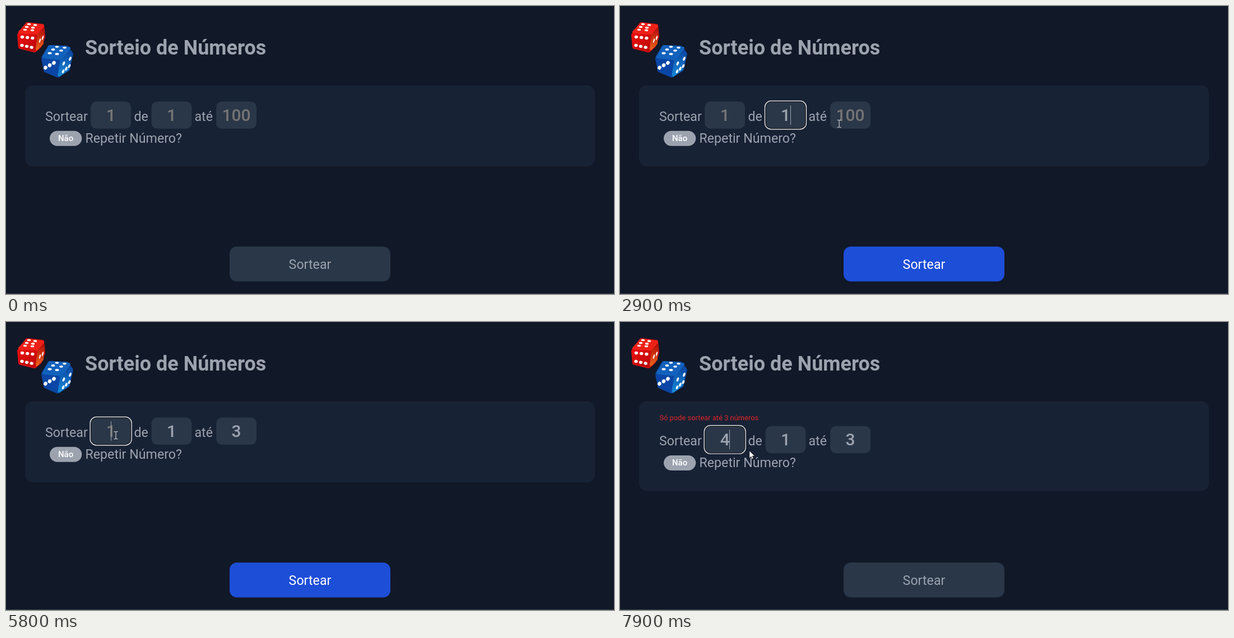
An HTML page that plays this animation: 1085 px wide and 516 px high, repeating every 8000 ms.

```html
<!DOCTYPE html>
<html lang="pt">
<head>
<meta charset="utf-8">
<title>Sorteio de Números</title>
<style>
  html, body { margin: 0; width: 100%; height: 100%; overflow: hidden; background: #111827; }
  svg { display: block; width: 1085px; height: 516px; }
  text { font-family: Roboto, sans-serif; fill: #9ca3af; }
  .label { font-size: 23.2px; }
  .value { font-size: 30px; font-weight: 500; text-anchor: middle; }
  .pips { fill: #fff; }
  .middle { text-anchor: middle; }
</style>
</head>
<body>
<svg viewBox="0 0 1085 516">
  <defs>
    <linearGradient id="redFront" x2="1" y2="1">
      <stop stop-color="#e80d0d"/><stop offset="1" stop-color="#bd0a0a"/>
    </linearGradient>
    <linearGradient id="redSide" x2="0" y2="1">
      <stop stop-color="#b60d08"/><stop offset="1" stop-color="#e8611c"/>
    </linearGradient>
    <linearGradient id="blueSide" x2="0" y2="1">
      <stop stop-color="#0c4ca8"/><stop offset="1" stop-color="#1687d6"/>
    </linearGradient>
  </defs>
  <rect width="1085" height="516" fill="#111827"/>
  <rect y="515" width="1085" height="1" fill="#3b424f"/>

  <g stroke-linejoin="round" stroke-width="8">
    <path d="M38 33L64 36L66 55L60 71L51 79L26 73L24 52Z" fill="#d31010" stroke="#d31010"/>
    <path d="M38 33L65 36L56 49L25 47Z" fill="#ee2118" stroke="#ee2118" stroke-width="6"/>
    <path d="M24 52L53 54L50 78L25 73Z" fill="url(#redFront)" stroke="url(#redFront)" stroke-width="6"/>
    <path d="M58 52L67 41L65 67L55 77Z" fill="url(#redSide)" stroke="url(#redSide)" stroke-width="4"/>
    <path d="M78 74L108 75L116 86L110 113L92 124L71 115L67 93Z" fill="#0b469e" stroke="#0b469e"/>
    <path d="M79 73L112 76L98 94L68 91Z" fill="#1262bd" stroke="#1262bd" stroke-width="6"/>
    <path d="M66 97L94 99L92 124L71 115Z" fill="#0a46a5" stroke="#0a46a5" stroke-width="5"/>
    <path d="M99 98L116 84L110 113L95 124Z" fill="url(#blueSide)" stroke="url(#blueSide)" stroke-width="5"/>
  </g>
  <g class="pips" id="pips"></g>

  <text x="141" y="87" font-size="36" font-weight="700">Sorteio de Números</text>

  <rect id="panel" x="34" y="142" width="1017" height="145.5" rx="14" fill="#182235"/>
  <text id="error" x="70.5" y="176" font-size="12.9" style="fill:#dc2626">Só pode sortear até 3 números</text>
  <g id="form">
    <text class="label" x="70" y="206">Sortear</text>
    <text class="label" x="228.5" y="206">de</text>
    <text class="label" x="336.5" y="206">até</text>
    <g id="fields"></g>
    <rect x="78" y="223.8" width="57.3" height="27" rx="13.5" fill="#9ca3af"/>
    <text class="middle" x="106.6" y="242" font-size="15" font-weight="500" style="fill:#fff">Não</text>
    <text class="label" x="141.5" y="245.3">Repetir Número?</text>
  </g>
  <g id="hint">
    <rect x="171" y="236" width="38" height="24" fill="#182235" opacity=".55"/>
    <text class="middle" x="183" y="249" font-size="12" style="fill:#4b5260">2</text>
  </g>
  <rect id="caret" y="178" width="1" height="35" fill="#9ca3af"/>

  <rect id="button" x="399" y="431" width="287" height="62.5" rx="13"/>
  <text id="buttonText" class="label middle" x="542.5" y="470.5">Sortear</text>

  <path id="arrow" d="M0 0V12.6L3 9.9L5 14.3L7 13.4L5.1 9.1H9.2Z" fill="#fff" stroke="#111" stroke-width=".5"/>
  <path id="beam" d="M-3.5 -6.5H-1L0 -5.8L1 -6.5H3.5M0 -6V6M-3.5 6.5H-1L0 5.8L1 6.5H3.5" fill="none" stroke="#e5e7eb"/>
</svg>
<script>
const LOOP = 8000, STEP = 100, SHIFT = 15.2;
const $ = id => document.getElementById(id);
const show = (node, on) => node.setAttribute('visibility', on ? 'visible' : 'hidden');

function make(parent, tag, attrs) {
  const node = document.createElementNS('http://www.w3.org/2000/svg', tag);
  for (const name in attrs) node.setAttribute(name, attrs[name]);
  return parent.appendChild(node);
}

// Rows of evenly spaced pips: first centre, spacing, count, radii, tilt.
const pipRows = [
  [41, 32.5, 11, 1.6, 2, 3.3, 1.8, 5],
  [37, 37.5, 11, 1.4, 2, 3.3, 1.8, 5],
  [34, 42.5, 13, 1, 2, 3.3, 1.8, 5],
  [29, 55.5, 9.2, 1, 3, 3.2, 2.7, 10],
  [28.5, 70.5, 8.6, 1.8, 3, 3.2, 2.7, 10],
  [60.5, 62, 5, -5, 2, 1.2, 4, 15],
  [91, 73, 13.5, 1.6, 2, 3.3, 1.8, 0],
  [84, 78, 14.5, 1.8, 2, 3.3, 1.9, 0],
  [78, 84.5, 13, 1.5, 2, 3.5, 2, 0],
  [70.5, 110.5, 7.5, -4.3, 3, 3.2, 3.6, 30],
  [103, 103, 11.5, -8.5, 2, 1.9, 3.8, 22],
  [102, 117, 5.5, -4.7, 3, 1.9, 3.6, 22]
];
for (const [x, y, dx, dy, count, rx, ry, tilt] of pipRows)
  for (let i = 0; i < count; i++)
    make($('pips'), 'ellipse', {
      rx, ry, transform: `translate(${x + i * dx} ${y + i * dy}) rotate(${tilt})`
    });

const fields = [
  { x: 151.3, hint: '1', value: '4', focus: 4800, blur: LOOP, typed: 5900 },
  { x: 259.6, hint: '1', value: '1', focus: 2300, blur: 3500, typed: 2900 },
  { x: 375.2, hint: '100', value: '3', focus: 3500, blur: 4800, typed: 3900 }
];
for (const f of fields) {
  const box = grow => ({
    x: f.x - grow, y: 171.3 - grow, width: 71.8 + 2 * grow, height: 48.4 + 2 * grow, rx: 10 + grow
  });
  const parent = $('fields');
  make(parent, 'rect', { ...box(0), fill: '#2a3748' });
  f.ring = make(parent, 'g', { fill: 'none', 'stroke-width': 1.2 });
  make(f.ring, 'rect', { ...box(0), stroke: '#101010' });
  make(f.ring, 'rect', { ...box(1.1), stroke: '#fff' });
  f.text = make(parent, 'text', { class: 'value', x: f.x + 35.9, y: 206 });
}

const caretToggles = [2300, 2800, 2900, 3400, 3500, 4400, 4800, 5300, 5800, 6500, 7000, 7400, 7900];

// Pointer stops: time, x, y, and the shape used until the next stop.
const stops = [
  [300, 2, 77, 'arrow'], [400, 90, 160, 'arrow'], [600, 300, 340, 'arrow'],
  [700, 345, 348, 'arrow'], [800, 361, 331, 'arrow'], [1000, 361, 331, 'arrow'],
  [1400, 253, 238, 'beam'], [1500, 238.5, 224.5, 'beam'], [1600, 229, 219.5, 'beam'],
  [1700, 229, 219.5, 'beam'], [2000, 287, 191, 'beam'], [2300, 287, 191, 'beam'],
  [2700, 379.5, 204.5, 'beam'], [3000, 397, 214, 'beam'], [3100, 397, 214, 'beam'],
  [3400, 416, 220, 'beam'], [3700, 422.5, 210.5, 'beam'], [3900, 422.5, 210.5, 'beam'],
  [4000, 390, 222, 'arrow'], [4200, 320, 236, 'arrow'], [4300, 320, 236, 'arrow'],
  [4600, 230, 204, 'beam'], [4700, 208.5, 197.5, 'beam'], [5100, 196, 203, 'beam'],
  [5800, 196, 203, 'beam'], [5900, 250, 225, 'arrow'], [6000, 290, 238, 'arrow'],
  [6900, 290, 238, 'arrow'], [7400, 231, 231, 'arrow'], [LOOP, 231, 231, 'arrow']
];

function drawPointer(t) {
  const next = stops.findIndex(s => s[0] > t);
  show($('arrow'), false);
  show($('beam'), false);
  if (next < 1) return;
  const [t0, x0, y0, shape] = stops[next - 1], [t1, x1, y1] = stops[next];
  const k = (t - t0) / (t1 - t0);
  $(shape).setAttribute('transform', `translate(${x0 + (x1 - x0) * k} ${y0 + (y1 - y0) * k})`);
  show($(shape), true);
}

function draw(t) {
  const failed = t >= 5900, ready = t >= 2900 && !failed;
  const offset = failed ? SHIFT : 0;
  $('form').setAttribute('transform', `translate(0 ${offset})`);
  $('panel').setAttribute('height', 145.5 + offset);
  show($('error'), failed);
  show($('hint'), failed && t < 6200);
  $('button').setAttribute('fill', ready ? '#1d4ed8' : '#2a3748');
  $('buttonText').style.fill = ready ? '#fff' : '#9ca3af';

  const caretOn = caretToggles.filter(at => at <= t).length % 2 === 1;
  show($('caret'), caretOn);
  for (const f of fields) {
    const focused = t >= f.focus && t < f.blur, filled = t >= f.typed;
    show(f.ring, focused);
    f.text.textContent = filled ? f.value : f.hint;
    f.text.style.fill = filled ? '#9ca3af' : '#757575';
    if (focused) {
      $('caret').setAttribute('x', Math.round(f.x + 35.7 + (filled ? 8.4 : 0)));
      $('caret').setAttribute('y', 178 + Math.round(offset));
    }
  }
  drawPointer(t);
}

const start = performance.now();
function tick() {
  const t = (performance.now() - start) % LOOP;
  draw(Math.floor(t / STEP) * STEP);
  requestAnimationFrame(tick);
}
tick();
</script>
</body>
</html>
```
